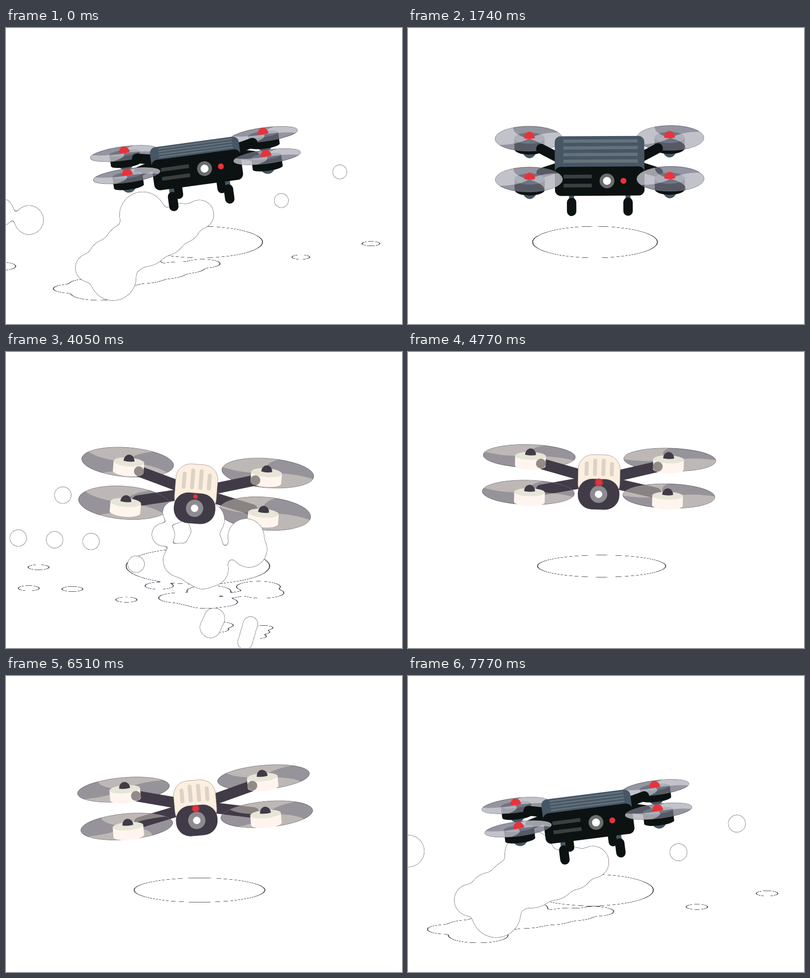
An HTML page that plays this animation: 800 by 600 pixels, repeating every 7.8 s.

```html
<!DOCTYPE html>
<html lang="en">
<head>
<meta charset="utf-8">
<title>Drones</title>
<style>
  html, body { margin: 0; width: 100%; height: 100%; overflow: hidden; background: #fff; }
  svg { display: block; width: 800px; height: 600px; }
</style>
</head>
<body>
<svg viewBox="0 0 800 600">
  <defs id="filters"></defs>
  <g id="stage"></g>
</svg>
<script>
const LOOP = 7800;
const stage = document.getElementById('stage');
const rad = d => d * Math.PI / 180;
const clamp = (v, lo, hi) => Math.min(hi, Math.max(lo, v));

// Merges soft shapes into one white blob with a thin outline.
const gooFilter = (id, blur, edge, color) => {
  const cut = (level, out) => `<feColorMatrix in="soft" result="${out}"
    values="0 0 0 0 0 0 0 0 0 0 0 0 0 0 0 0 0 0 40 ${-40 * level}"/>`;
  return `<filter id="${id}" filterUnits="userSpaceOnUse" x="-60" y="-60" width="920" height="720" color-interpolation-filters="sRGB">
    <feGaussianBlur stdDeviation="${blur}" result="soft"/>${cut(.45 - edge, 'outer')}${cut(.45, 'inner')}
    <feFlood flood-color="${color}"/><feComposite in2="outer" operator="in" result="line"/>
    <feFlood flood-color="#fff"/><feComposite in2="inner" operator="in" result="fill"/>
    <feMerge><feMergeNode in="line"/><feMergeNode in="fill"/></feMerge></filter>`;
};
document.getElementById('filters').innerHTML =
  gooFilter('cloud', '6', .06, '#85848b') + gooFilter('shade', '6 1.8', .14, '#55515f');

// SVG helpers
const ellipse = (x, y, rx, ry, fill, extra = '') =>
  `<ellipse cx="${x}" cy="${y}" rx="${rx}" ry="${ry}" fill="${fill}" ${extra}/>`;
const circle = (x, y, r, fill, extra) => ellipse(x, y, r, r, fill, extra);
const rect = (x, y, w, h, r, fill) =>
  `<rect x="${x}" y="${y}" width="${w}" height="${h}" rx="${r}" fill="${fill}"/>`;
const line = (x1, y1, x2, y2, w, color) =>
  `<path d="M${x1} ${y1}L${x2} ${y2}" stroke="${color}" stroke-width="${w}" stroke-linecap="round"/>`;
const place = ({ x, y, tilt }, inner) =>
  `<g transform="translate(${x} ${y}) rotate(${tilt})">${inner}</g>`;
const goo = (id, inner) => inner && `<g filter="url(#${id})">${inner}</g>`;
const both = f => f(-1) + f(1);
const cylinder = (x, top, bottom, rx, ry, fill) =>
  `<path d="M${x - rx} ${top}V${bottom}A${rx} ${ry} 0 0 0 ${x + rx} ${bottom}V${top}Z" fill="${fill}"/>`;
const dome = (x, y, s, fill) =>
  `<path d="M${x - 11} ${y + 5}A11 13 0 0 1 ${x + 11} ${y + 5}Q${x} ${y + 5 + 9 * s} ${x - 11} ${y + 5}" fill="${fill}"/>`;

function propeller(x, y, rx, ry, angle, disc, blade) {
  const at = (r, d) => `${r * Math.cos(rad(d))} ${r * Math.sin(rad(d))}`;
  const wing = a => `M0 0Q${at(.6, a - 72)} ${at(1, a - 46)}A1 1 0 0 1 ${at(1, a + 46)}Q${at(.6, a + 20)} 0 0Z`;
  return `<g transform="translate(${x} ${y}) scale(${rx} ${ry})">`
    + circle(0, 0, 1, disc, 'stroke="#666570" stroke-width="1" vector-effect="non-scaling-stroke"')
    + `<path d="${wing(angle)}${wing(angle + 180)}" fill="${blade}"/></g>`;
}
const spin = (t, base) => base + t * 10 * 180 / LOOP;

// Motion: a damped swing on arrival, a wave while hovering, a wind-up before leaving
const swing = d => 150 * Math.exp(-d / 200) * Math.sin((d - 10) / 255);
const bump = (t, peak, width) => Math.exp(-(((t - peak) / width) ** 2));
const wave = (t, peak, period) => Math.cos(2 * Math.PI * (t - peak) / period);
function windUp(t, from) {
  const u = clamp((t - from) / 540, 0, 1);
  return u * u * (2.7 * u - 1.7);
}

function boxPose(t) {
  if (t < -360 || t > 3000) return null;
  const brake = bump(t, 130, 350), leave = windUp(t, 2460);
  return {
    x: 387 + swing(t) - 640 * leave,
    y: 254 - 5 * wave(t, 0, 3480) - .5 * swing(t) - 100 * leave,
    tilt: -.3 - 8.5 * brake - 14 * leave,
    pitch: .373 - .193 * brake - .1 * leave
  };
}

function podPose(t) {
  if (t < 3050 || t > 7050) return null;
  const leave = windUp(t, 6510);
  const tilt = 6.8 * wave(t, 5402, 2900) + 12.8 * bump(t, 3900, 400);
  const y = 239.5 + 13.9 * wave(t, 4050, 2900) + 14.6 * Math.exp((4050 - t) / 600) - 70 * leave;
  return {
    x: 385 + .71 * tilt - swing(t - 3400) + 680 * leave,
    y, tilt: tilt + 14 * leave, lift: y - 225.8
  };
}

// Each drone is split in layers so that smoke can pass between them.
// A point at depth z and height h is seen at z * pitch - h * cos(pitch).
const projector = (s, c) => (z, h) => z * s - h * c;

function boxDrone(t, pose) {
  const s = pose.pitch, c = Math.sqrt(1 - s * s), Y = projector(s, c);
  const ink = '#0b1211', steel = '#465665';
  const rotor = (side, z) => {
    const px = side * 141.5, py = Y(z, 0), ry = 30.5 * s;
    return ellipse(px, py + 24 * c, 16, 10 + 36 * s, steel)
      + cylinder(px, py + 5, py + 29 * c, 30.5, ry, ink)
      + ellipse(px, py + 5, 30.5, ry, '#6b7c88')
      + propeller(px + side * 1.5, py + 6, 68, 67.5 * s, spin(t, 155), 'rgba(112,114,130,.75)', 'rgba(255,255,255,.43)')
      + dome(px, py, s, '#e8333b');
  };
  const arm = (side, z1, h1, z2) => line(side * 118, Y(z1, h1), side * 82, Y(z2, -4.5), 20, ink);
  const leg = (px, z) => line(px, Y(z, -30), px, Y(z, -62), 10, steel)
    + line(px, Y(z, -58) + 9.5, px, Y(z, -98) - 9.5, 19, ink);
  const top = Y(-112, -2), front = Y(96, 14.9), tall = front - top, lens = Y(96, -16.4);
  const body = both(v => line(v * 44, Y(-30, -30), v * 44, Y(-30, -98) - 9, 18, ink))
    + both(v => rotor(v, -111)) + both(v => arm(v, -66, -10.6, 0)) + both(v => arm(v, 66, -10.6, 50))
    + both(v => leg(v * 57, 83))
    + rect(-90.5, top, 181, tall + 18, 12, steel)
    + [0, 1, 2, 3].map(i => rect(-73, top + tall * (.11 + .22 * i), 150, tall * .105, 0, '#65727b')).join('')
    + rect(-90.5, front, 181, Y(96, -48.7) - front, 12, ink)
    + both(v => rect(-73, lens + v * 9.2 - 3.7, 57, 7.4, 0, '#3c3f3f'))
    + circle(14.7, lens, 15, '#6b6d6d') + circle(14.7, lens, 8, '#fff') + circle(48, lens, 6, '#e8333b')
    + both(v => rotor(v, 111));
  return {
    shadow: ellipse(pose.x - 10 - pose.tilt * 2.65, 434, 124.5, 31.5),
    back: '', front: place(pose, body)
  };
}

function podDrone(t, pose) {
  const { lift } = pose, s = .238 + lift * .00128, c = Math.sqrt(1 - s * s), Y = projector(s, c);
  const ink = '#413b47';
  const rotor = (side, z) => {
    const px = side * 139.5, py = Y(z, 0), ry = 31 * s, rear = z < 0;
    const arm = (inner, w, color) => rear ? line(side * 118, Y(-75, -5), side * inner, Y(inner - 118 ? 0 : -75, -5), w, color) : '';
    return propeller(px + side * 2.5, py + 7.5, 93, Math.max(8, rear ? 204 * s - 30 : 282 * s - 49),
        spin(t, side < 0 ? 41 : 21), 'rgba(65,59,71,.55)', 'rgba(247,240,220,.4)')
      + arm(42, 22, ink)
      + cylinder(px, py + 7, py + 28 * c, 31, ry, '#fff5ee') + ellipse(px, py + 7, 31, ry, '#e7e5d8')
      + arm(118, 20, '#938b88') + dome(px, py, s, ink);
  };
  const top = Y(-148, -3), lens = Y(150, -5.4), face = lens - 31, tall = face - top;
  const slot = i => {
    const from = top + tall * (i % 3 ? .16 : .29);
    return rect(17 * i - 29.5, from, 8, top + tall * .88 - from, 4, '#dcd3c6');
  };
  const beat = ((t - 6350 + LOOP) % 1950) / 1950;
  const halo = beat < .3 ? 4 * Math.sin(Math.PI * beat / .3) : 0;
  const rotors = both(v => line(v * 116, Y(130, -5), v * 40, Y(70, -5), 22, ink))
    + both(v => rotor(v, -141)) + both(v => rotor(v, 141));
  const body = `<rect x="-42.5" y="${top}" width="85" height="${tall + 40}" rx="30" fill="#fcefdf" stroke="#777" stroke-width=".6"/>`
    + [0, 1, 2, 3].map(slot).join('')
    + rect(-42, face, 84, 62, 29, ink)
    + circle(0, lens, 17.5, '#8d8b90') + circle(0, lens, 7.5, '#fff')
    + circle(0, lens - 24, 4.5 + halo, '#e8333b', 'opacity=".85"') + circle(0, lens - 24, 4.5, '#e8333b');
  return {
    shadow: ellipse(pose.x + 6 - pose.tilt * .7, 434, Math.max(90, 116.5 + lift * .64), Math.max(4, 11 + lift * .6)),
    back: place(pose, rotors), front: place(pose, body)
  };
}

// Smoke: rows of puffs between two points, thicker in the middle by "bulge"
const row = (x0, y0, x1, y1, count, r, bulge = 0) => Array.from({ length: count }, (_, i) => {
  const u = i / (count - 1);
  return { x: x0 + (x1 - x0) * u, y: y0 + (y1 - y0) * u, r: r + bulge * Math.sin(Math.PI * u) };
});

const bursts = [
  {
    time: 0, lead: 420,
    flow: x => {
      const k = clamp((450 - x) / 300, 0, 1);
      return [.33 + 1.2 * k, -.27 + 1.5 * k];
    },
    puffs: [row(168, 485, 390, 378, 7, 29, 22), row(215, 505, 275, 378, 3, 46),
      row(-15, 372, 45, 388, 2, 29), row(556, 350, 674, 292, 2, 14.5)].flat()
  },
  {
    time: 3030, lead: 300, flow: () => [-1.2, .1],
    puffs: [row(524, 390, 605, 405, 3, 41), row(570, 430, 608, 455, 2, 37),
      row(640, 415, 766, 397, 4, 20), row(740, 400, 742, 446, 2, 17), row(792, 438, 850, 430, 2, 22)].flat()
  },
  {
    time: 4050, lead: 350, flow: x => [x < 280 ? -.25 : -.08, .1],
    puffs: [row(318, 370, 340, 325, 2, 23), row(352, 422, 415, 440, 3, 34, 6), row(398, 444, 405, 340, 3, 36),
      row(485, 374, 491, 400, 2, 36), row(440, 412, 455, 404, 2, 14), row(25, 377, 172, 384, 3, 17),
      row(115, 290, 263, 430, 2, 17), row(421, 540, 413, 558, 2, 21), row(494, 551, 483, 588, 3, 15)].flat()
  }
];

function puffsAt(t) {
  return bursts.flatMap(({ time, lead, flow, puffs }) => {
    const d = t - time;
    if (d < -lead) return [];
    const glide = d < 0 ? d : 400 * (1 - Math.exp(-d / 400)), fall = 60 * Math.tanh(d / 60);
    const grow = Math.min(1, (d + lead) / 150);
    return puffs.map(({ x, y, r }) => {
      const [vx, vy] = flow(x);
      return { x: x + vx * glide, y: y + vy * fall, r: grow * (r - .1 * Math.max(d, -30)) };
    }).filter(p => p.r > 2);
  });
}

function draw(now) {
  const t = now % LOOP, early = t > 7300 ? t - LOOP : t;
  const box = boxPose(early), pod = podPose(t);
  const drones = [box && boxDrone(early, box), pod && podDrone(t, pod)].filter(Boolean);
  const layer = name => drones.map(d => d[name]).join('');
  const puffs = puffsAt(early);
  const shades = puffs.map(p => ellipse(p.x + .2 * (p.x - 360), 300 + .47 * p.y, p.r * 1.2, p.r * .3)).join('');
  const clouds = puffs.map(p => circle(p.x, p.y, p.r)).join('');
  stage.innerHTML = goo('shade', layer('shadow') + shades) + layer('back') + goo('cloud', clouds) + layer('front');
}

const start = performance.now();
function tick() {
  draw(performance.now() - start);
  requestAnimationFrame(tick);
}
tick();
</script>
</body>
</html>
```
